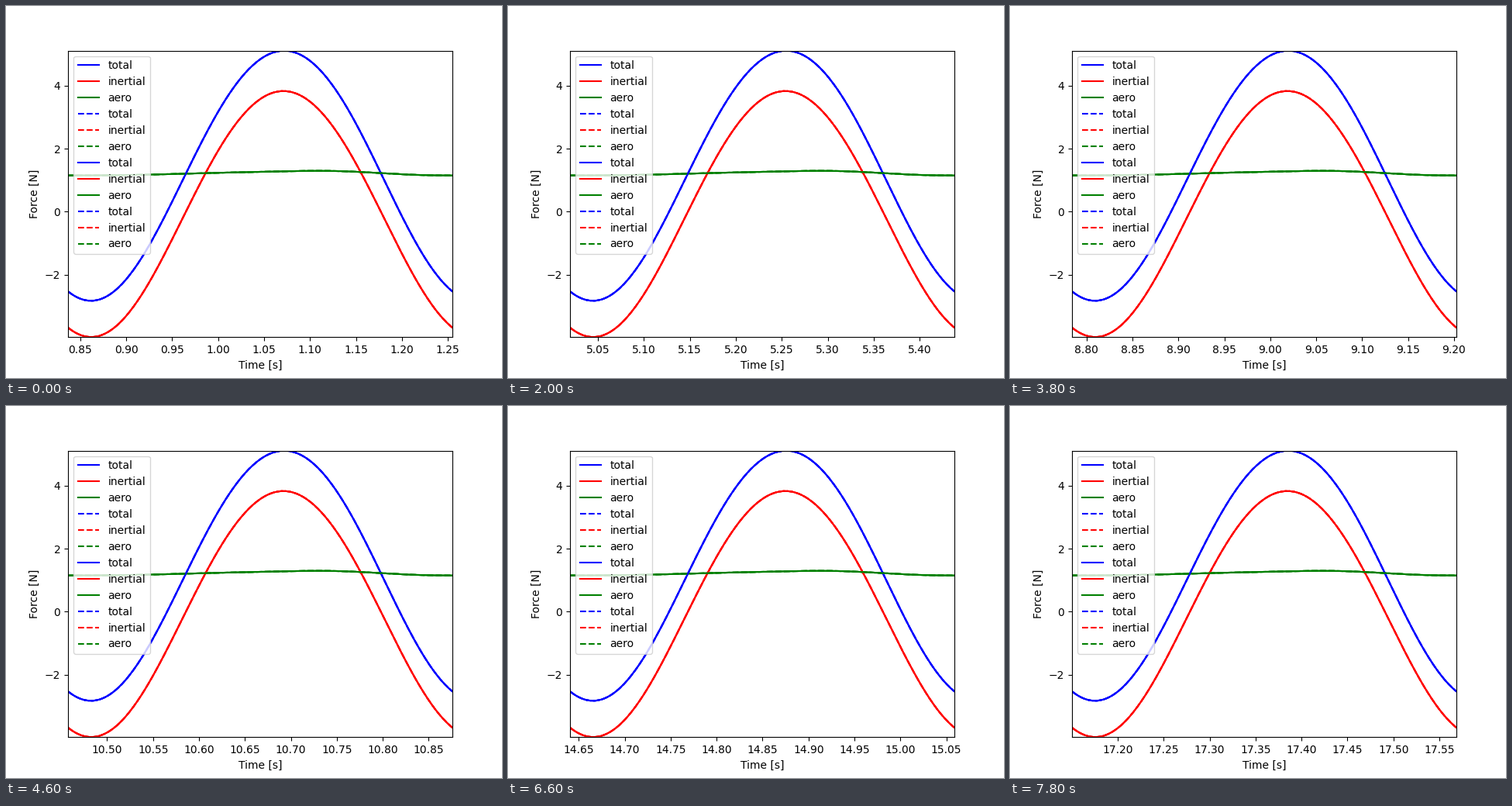
Write a matplotlib script that moves like this. It is 640 px wide and 480 px high and loops after 8000 ms.

```python
import numpy as np
import matplotlib.pyplot as plt
from matplotlib.animation import FuncAnimation

FRAMES = 40
STEP_MS = 200
PERIOD = 0.418298         # seconds in one cycle, which fills one window
PEAK = 0.5603             # where in the window the inertial force peaks
COLORS = {"total": "blue", "inertial": "red", "aero": "green"}


def inertial_force(phase):
    swing = 2 * np.pi * (phase - PEAK)
    return 0.007 + 3.905 * np.cos(swing) - 0.082 * np.cos(2 * swing)


def aero_force(phase):
    u = 2 * np.pi * phase
    return (1.2176 + 0.0706 * np.cos(u - 3.663)
            + 0.0144 * np.cos(2 * u - 2.39) + 0.0057 * np.cos(3 * u - 0.735))


phase = np.linspace(0, 1, 201)
inertial = inertial_force(phase)
aero = aero_force(phase)
forces = {"total": inertial + aero, "inertial": inertial, "aero": aero}

fig, ax = plt.subplots(figsize=(6.4, 4.8), dpi=100)
ax.set_xlabel("Time [s]")
ax.set_ylabel("Force [N]")
ax.set_ylim(-3.982, 5.114)

lines = []
for style in ("-", "--") * 2:
    for name, color in COLORS.items():
        lines += ax.plot(phase, forces[name], style, color=color, label=name)
ax.legend(loc="upper left")


def update(i):
    """Show cycle i + 2 of the motion."""
    start = (i + 2) * PERIOD
    for line in lines:
        line.set_xdata(start + phase * PERIOD)
    ax.set_xlim(start, start + PERIOD)
    return lines


anim = FuncAnimation(fig, update, frames=FRAMES, interval=STEP_MS,
                     init_func=lambda: update(0), repeat=True, repeat_delay=0)
plt.show()
```
